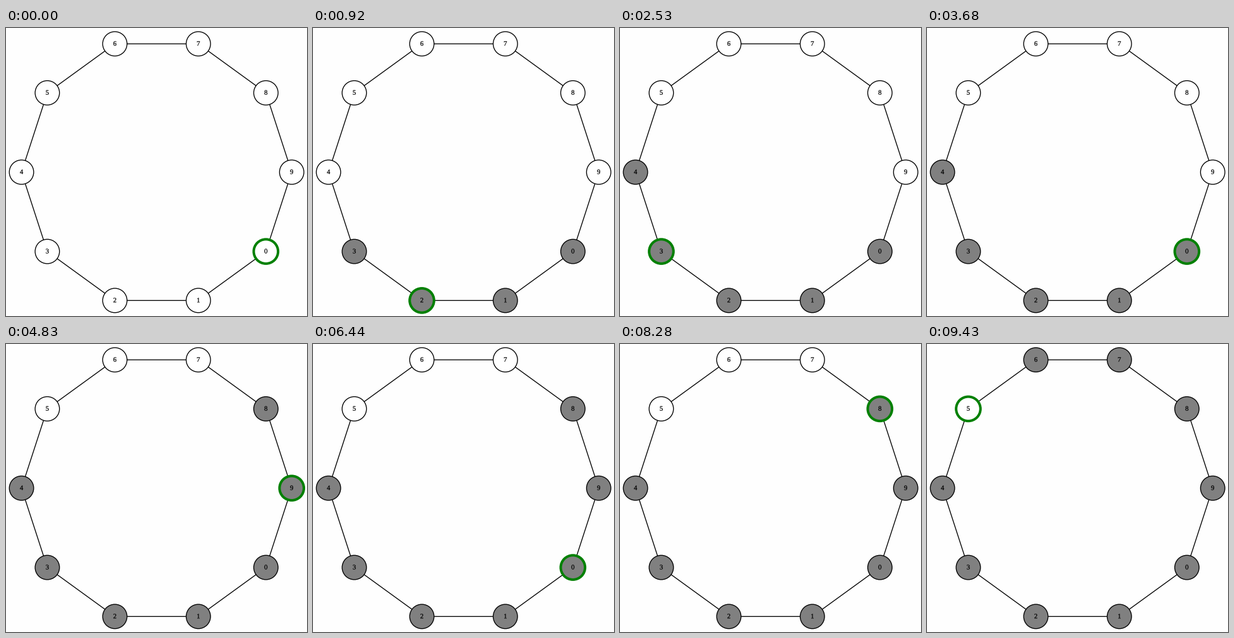
Animation of 477 by 457 pixels, one loop 9660 ms. Source, as a matplotlib script:

```python
import numpy as np
import matplotlib.pyplot as plt
from matplotlib.animation import FuncAnimation
from matplotlib.patches import Circle, PathPatch
from matplotlib.textpath import TextPath

W, H, DPI = 477, 457, 96
STEP_MS = 230
COUNT = 10
CX, CY = 238.65, H - 228.75
RING, NODE = 214.1, 19.3
THIN, THICK = 1, 3
EM = 8 * DPI / 72

# Each leg: walk to this node, then rock back and forth this many times
LEGS = [(3, 2), (4, 1), (2, 1), (-2, 0), (0, 3), (1, 2), (-2, 1), (-3, 1), (-5, 0)]


def walk(legs):
    path = [0]
    for goal, rocks in legs:
        step = 1 if goal > path[-1] else -1
        path += range(path[-1] + step, goal + step, step)
        path += [goal - step, goal] * rocks
    return [p % COUNT for p in path]


def digit(i, x, y):
    # Digits are half an em wide
    shape = TextPath((x - EM / 4, y - 2.9), str(i), size=EM,
                     prop={"family": "Liberation Serif"})
    ax.add_patch(PathPatch(shape, facecolor="black", edgecolor="black",
                           lw=0.2, zorder=3))


fig = plt.figure(figsize=(W / DPI, H / DPI), dpi=DPI, facecolor="#fefefe")
ax = fig.add_axes([0, 0, 1, 1])
ax.set_xlim(0, W)
ax.set_ylim(0, H)
ax.axis("off")

# Node 0 sits at the lower right; numbering runs clockwise
angles = -2 * np.pi / COUNT * (np.arange(COUNT) + 1)
xs = CX + RING * np.cos(angles)
ys = CY + RING * np.sin(angles)

ax.plot(np.append(xs, xs[0]), np.append(ys, ys[0]),
        color="black", lw=THIN, zorder=1)

nodes = []
for i, (x, y) in enumerate(zip(xs, ys)):
    nodes.append(ax.add_patch(Circle((x, y), NODE, zorder=2)))
    digit(i, x, y)

path = walk(LEGS)


def draw(step):
    here, seen = path[step], path[:step]
    for i, node in enumerate(nodes):
        node.set_facecolor("#808080" if i in seen else "white")
        node.set_edgecolor("#008000" if i == here else "black")
        node.set_linewidth(THICK if i == here else THIN)
    return nodes


anim = FuncAnimation(fig, draw, frames=len(path), interval=STEP_MS,
                     init_func=lambda: draw(0), repeat=True, repeat_delay=0)
plt.show()
```
